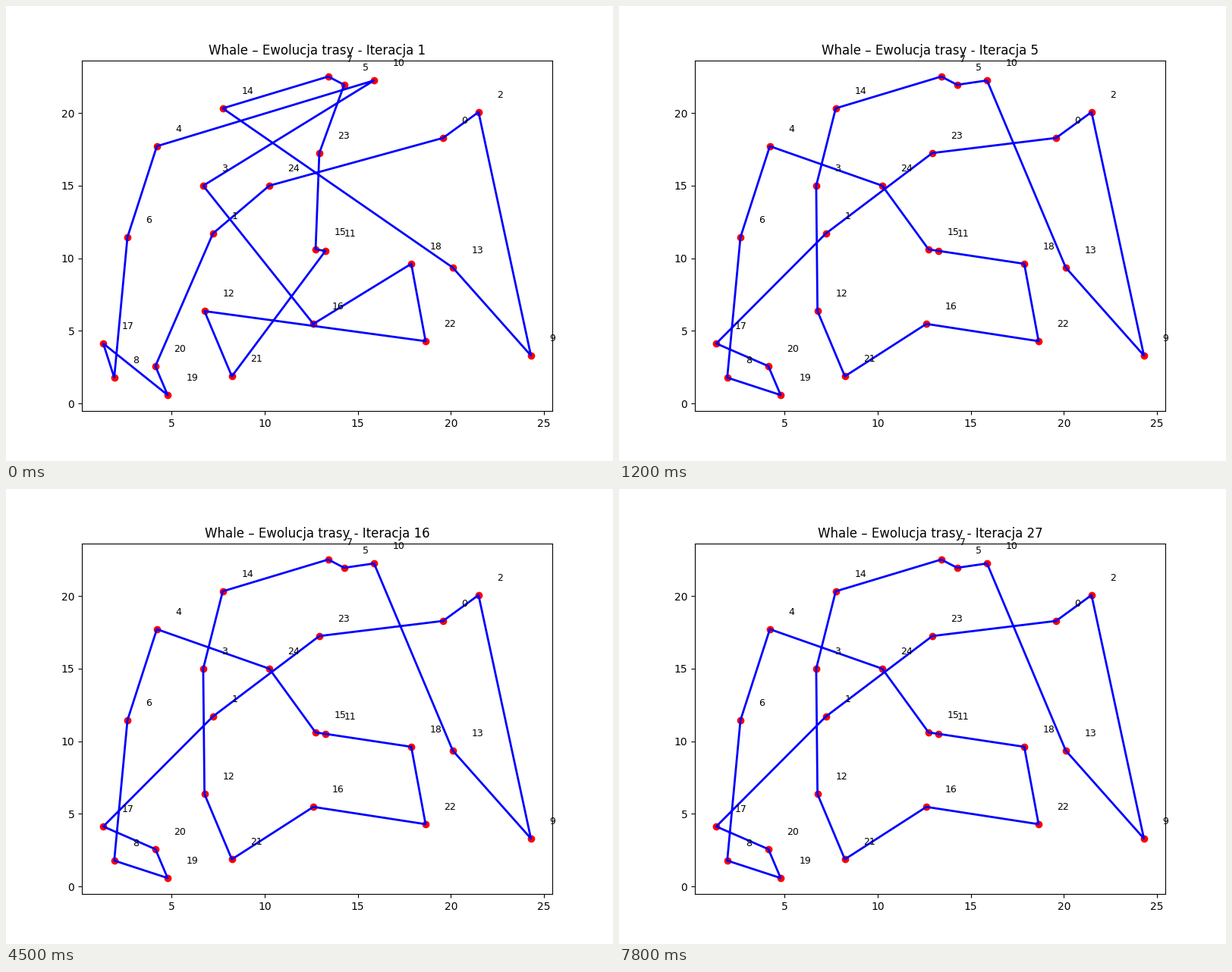
Recreate the animation shown at these times as a matplotlib script. Size 800 px wide and 600 px high, loop 8000 ms.

```python
import matplotlib.pyplot as plt
from matplotlib.animation import FuncAnimation

INTERVAL = 100          # ms per frame
FRAMES = 80
FRAMES_PER_ITERATION = 3

# Cities by label, in the visiting order of the first tour.
CITIES = {
    0: (19.58, 18.29), 2: (21.485, 20.07), 9: (24.30, 3.30), 13: (20.10, 9.36),
    14: (7.74, 20.33), 7: (13.41, 22.52), 5: (14.265, 21.95), 23: (12.93, 17.25),
    15: (12.73, 10.61), 11: (13.26, 10.51), 21: (8.23, 1.87), 12: (6.76, 6.36),
    22: (18.64, 4.29), 18: (17.87, 9.62), 16: (12.61, 5.48), 3: (6.69, 15.00),
    10: (15.87, 22.25), 4: (4.20, 17.72), 6: (2.62, 11.45), 8: (1.91, 1.78),
    17: (1.32, 4.13), 19: (4.78, 0.58), 20: (4.12, 2.57), 1: (7.215, 11.71),
    24: (10.24, 15.00),
}

# Improvements per iteration: {anchor: cities moved to follow it}.
IMPROVEMENTS = [
    {13: [10], 5: [14, 3, 16, 12, 21], 18: [11, 15, 24], 1: [23]},
    {5: [7], 21: [16], 20: [17]},
]


def relocate(tour, moves):
    """Take the moved cities out and splice them in behind their anchors."""
    moved = set(sum(moves.values(), []))
    kept = [city for city in tour if city not in moved]
    for anchor, chain in moves.items():
        at = (kept if anchor in kept else tour).index(anchor) + 1
        kept[at:at] = chain
    return kept


def tour_at(step):
    tour = list(CITIES)
    for moves in IMPROVEMENTS[:step]:
        tour = relocate(tour, moves)
    return tour


def closed_path(tour):
    return zip(*(CITIES[city] for city in tour + tour[:1]))


fig, ax = plt.subplots(figsize=(8, 6), dpi=100)
ax.scatter(*zip(*CITIES.values()), c="red")
route, = ax.plot(*closed_path(tour_at(0)), "b-", linewidth=2)
for label, (x, y) in CITIES.items():
    ax.text(x + 1, y + 1, str(label), fontsize=9)
title = ax.set_title("")


def update(frame):
    step = frame // FRAMES_PER_ITERATION
    route.set_data(*closed_path(tour_at(step)))
    title.set_text(f"Whale – Ewolucja trasy - Iteracja {step + 1}")
    return route, title


anim = FuncAnimation(fig, update, frames=FRAMES, interval=INTERVAL,
                     repeat=True, repeat_delay=0)
plt.show()
```
